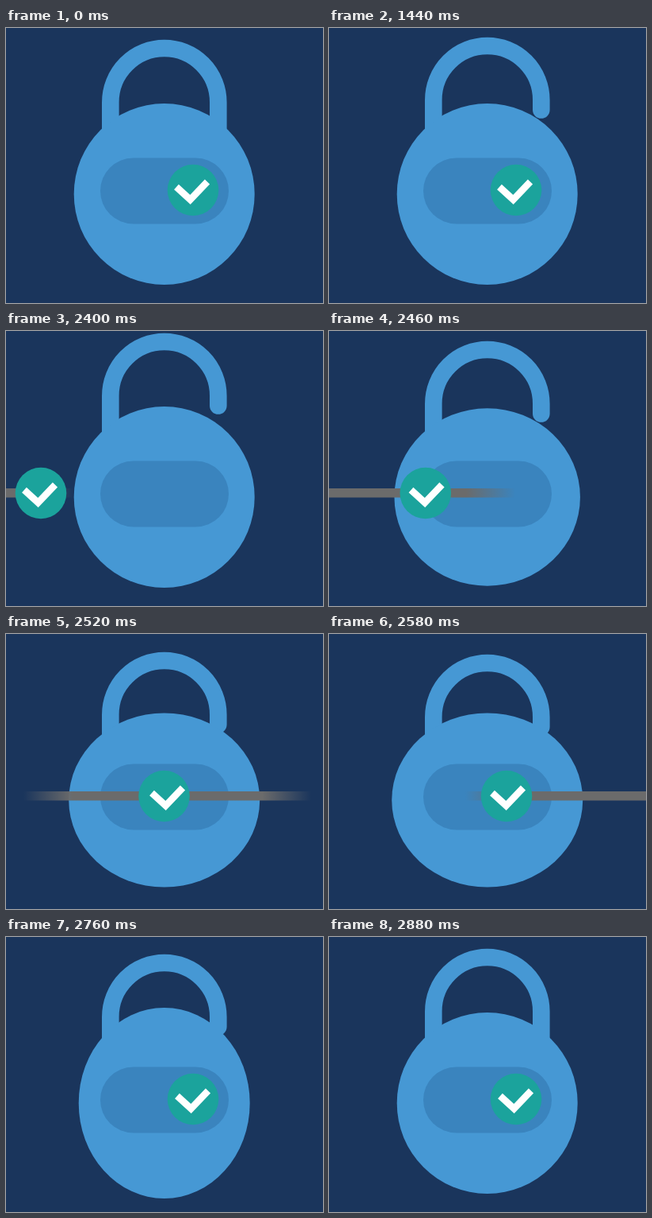
These frames come from a looping animation (400 by 346 pixels, 3780 ms). An HTML page:

```html
<!DOCTYPE html>
<html lang="en">
<head>
<meta charset="utf-8">
<title>Lock toggle</title>
<style>
  html, body { margin: 0; width: 100%; height: 100%; overflow: hidden; background: #1a355c; }
  svg { display: block; width: 100%; height: 100%; }
</style>
</head>
<body>
<svg viewBox="0 0 400 346">
  <defs>
    <linearGradient id="fade">
      <stop offset="0" stop-color="#6b6b6b" stop-opacity="0"/>
      <stop offset=".17" stop-color="#6b6b6b"/>
      <stop offset=".83" stop-color="#6b6b6b"/>
      <stop offset="1" stop-color="#6b6b6b" stop-opacity="0"/>
    </linearGradient>
  </defs>
  <rect width="400" height="346" fill="#1a355c"/>
  <g fill="none" stroke="#4698d4" stroke-width="21.6" stroke-linecap="round">
    <path id="shackle"/>
  </g>
  <ellipse id="body" cx="199.7" cy="209" fill="#4698d4"/>
  <rect x="119" y="163.5" width="162" height="83" rx="41.5" fill="#3a84be"/>
  <rect id="trail" y="198" width="363" height="11.5" fill="url(#fade)"/>
  <circle id="badge" cy="204" r="32.3" fill="#1ba39c"/>
  <path id="check" d="M3 200L20.5 216L42 193.5" fill="none" stroke="#fff" stroke-width="8.6"/>
</svg>
<script>
const LOOP = 3780, STEP = 60;
const UNLOCK = 1440, OPEN = 1620, LAUNCH = 2400, CLOSED = 2880;
const part = id => document.getElementById(id);
const shackle = part('shackle'), body = part('body'), trail = part('trail');
const badge = part('badge'), check = part('check');

// Each track is a list of [ms, value] keys with linear motion between them.
const tracks = {
  lift: [[0, 14.5], [1380, 14.5], [OPEN, 2.5], [LAUNCH, 2.5], [2520, 22.5], [2640, 28.5], [CLOSED, 14.5]],
  rx: [[LAUNCH, 114], [2520, 120.5], [2640, 120.5], [2760, 108], [CLOSED, 114]],
  ry: [[LAUNCH, 114], [2520, 109.5], [2640, 109.5], [2760, 120], [CLOSED, 114]],
  badgeX: [[UNLOCK, 236], [OPEN, 223.5], [2399, 223.5], [LAUNCH, 44], [2520, 199.5], [2580, 224], [2640, 236]],
  badgeAlpha: [[UNLOCK, 1], [OPEN, .5], [2399, .5], [LAUNCH, 1]],
  checkX: [[UNLOCK, 212], [OPEN, 199.5], [2399, 199.5], [LAUNCH, 20], [2520, 181], [2580, 203], [2640, 213]],
  checkAlpha: [[UNLOCK, 1], [OPEN, 0], [2399, 0], [LAUNCH, 1]]
};

function sample(keys, t) {
  const i = keys.findIndex(key => key[0] > t);
  if (i === 0) return keys[0][1];
  if (i < 0) return keys[keys.length - 1][1];
  const [t0, a] = keys[i - 1], [t1, b] = keys[i];
  return a + (b - a) * (t - t0) / (t1 - t0);
}

function set(node, attributes) {
  for (const name in attributes) node.setAttribute(name, attributes[name]);
}

function render(t) {
  const at = name => sample(tracks[name], t);
  const lift = at('lift');
  const locked = t < UNLOCK || t >= CLOSED;
  const legEnd = locked ? 140 : lift + 91.5;
  set(shackle, { d: `M131.8 140V${lift + 79}a68 68 0 0 1 136 0V${legEnd}` });
  set(body, { rx: at('rx'), ry: at('ry') });
  set(badge, { cx: at('badgeX'), opacity: at('badgeAlpha') });
  set(check, { transform: `translate(${at('checkX')} 0)`, opacity: at('checkAlpha') });
  set(trail, {
    x: -278 + 2.5 * (t - LAUNCH),
    visibility: t >= LAUNCH && t < 2700 ? 'visible' : 'hidden'
  });
}

const start = performance.now();
function tick() {
  const t = (performance.now() - start) % LOOP;
  render(Math.floor(t / STEP) * STEP);
  requestAnimationFrame(tick);
}
tick();
</script>
</body>
</html>
```
